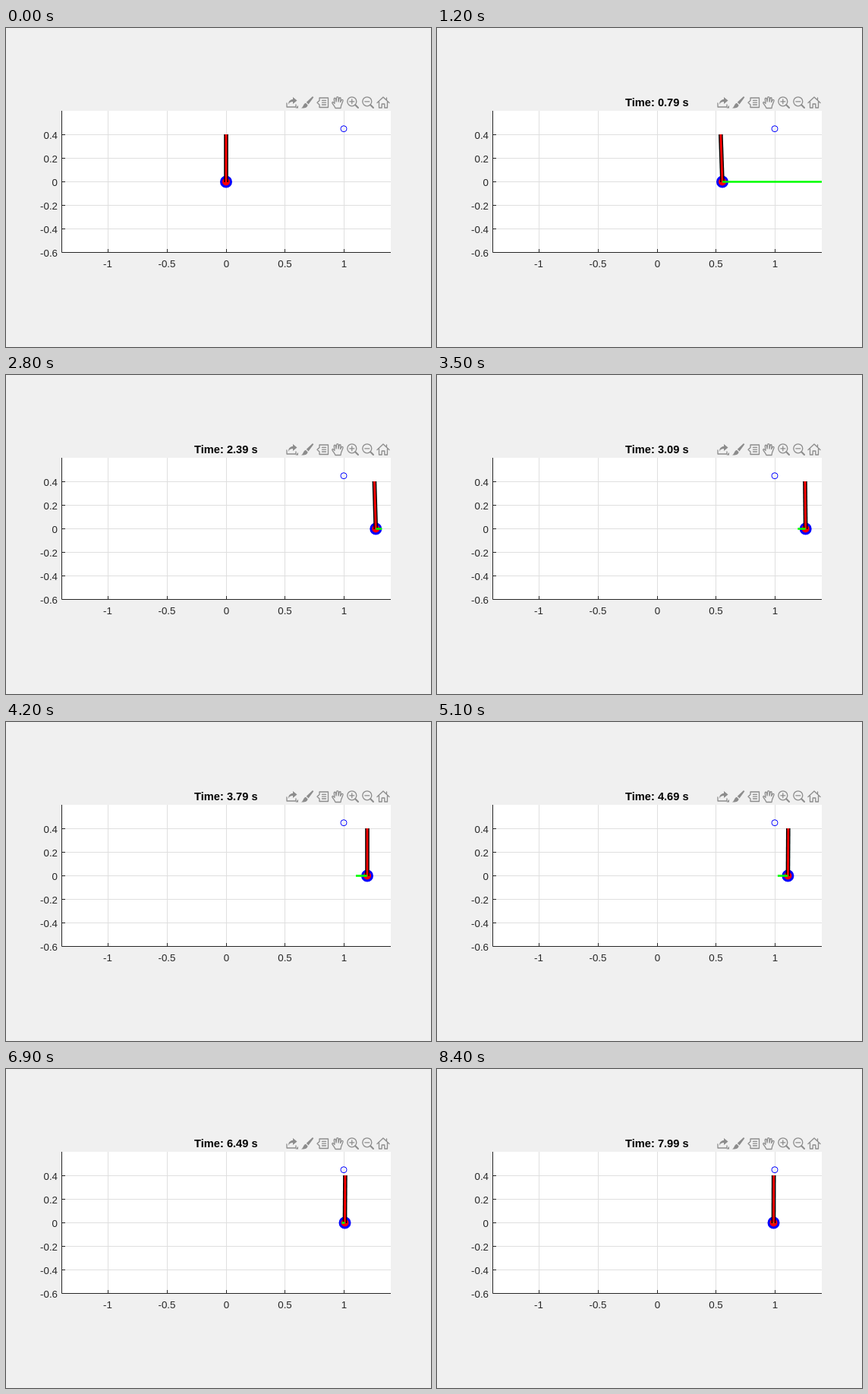
An HTML page for the animation above (8.5 s loop, 560x420 px).

```html
<!DOCTYPE html>
<html lang="en">
<head>
<meta charset="utf-8">
<title>Cart and pole</title>
<style>
  html, body { margin: 0; width: 100%; height: 100%; overflow: hidden; background: #f0f0f0; }
  svg { display: block; width: 560px; height: 420px; }
  text { font: 13.33px "Liberation Sans", Arial, sans-serif; fill: #262626; }
  #title { font-size: 14.67px; font-weight: bold; fill: #000; }
  #grid { stroke: #dfdfdf; }
  #axes { stroke: #262626; fill: none; }
  #tools { stroke: #8c8c8c; stroke-width: 1.3; fill: none; stroke-linecap: round; stroke-linejoin: round; }
  #tools .solid { fill: #8c8c8c; stroke: none; }
</style>
</head>
<body>
<svg viewBox="0 0 560 420">
  <defs>
    <clipPath id="plot"><rect x="73" y="109" width="434" height="187"/></clipPath>
    <g id="lens">
      <circle cx="-1.2" cy="-1.2" r="6"/>
      <path d="M3.2 3.2L7 7" stroke-width="2"/>
    </g>
  </defs>
  <rect width="560" height="420" fill="#f0f0f0"/>
  <rect x="73" y="109" width="434" height="187" fill="#fff"/>
  <path id="grid"/>
  <path id="axes"/>
  <g id="labels"></g>
  <text id="title" x="248" y="103"></text>

  <g id="tools">
    <g transform="translate(377 98)">
      <path d="M-7 1V6H5V3"/>
      <path class="solid" d="M-5 3C-5 -2 -2 -4 1 -4V-7L6.5 -2.5L1 2V-1C-2 -1 -4 0 -5 3ZM4.5 7.5H8V4Z"/>
    </g>
    <g transform="translate(397 98)">
      <path class="solid" d="M7 -8L8.3 -6.7L1.5 2.5L-1.2 -.2ZM-2 .8L.6 3.4C0 7 -4 7.5 -8 7.5C-5 6 -5.5 2 -2 .8Z"/>
    </g>
    <g transform="translate(417 98)">
      <path d="M-4 -6H7.5V6.5H-4V3L-7 .2L-4 -2.6ZM-.5 -2.6H4.5M-.5 .2H4.5M-.5 3H4.5"/>
    </g>
    <g transform="translate(437 98)">
      <path d="M-3 7.5C-4 5 -6 3 -7.2 .8C-7.5 -1 -5.5 -1 -4 1.5L-4.8 -4.5C-4.8 -6.2 -2.8 -6.2 -2.6 -4.5L-2 -1L-1.5 -6C-1.2 -7.8 .8 -7.8 1 -6V-1L2 -5.3C2.5 -6.8 4.3 -6.5 4.1 -4.8L3.6 -.5L5 -3C6 -4.2 7.5 -3.4 7 -2L4.5 4.5L4 7.5Z"/>
    </g>
    <g transform="translate(457 98)"><use href="#lens"/><path d="M-4.2 -1.2H1.8M-1.2 -4.2V1.8"/></g>
    <g transform="translate(477 98)"><use href="#lens"/><path d="M-4.2 -1.2H1.8"/></g>
    <g transform="translate(497 98)"><path d="M-8 .5L0 -7L8 .5M-5.5 -1V7H-1.8V2H1.8V7H5.5V-1M4.5 -6V-3.5"/></g>
  </g>

  <g clip-path="url(#plot)">
    <circle id="wheel" cy="202.5" r="6.5" fill="#f00" stroke="#00f" stroke-width="3"/>
    <path id="poleEdge" stroke="#000" stroke-width="5.6"/>
    <path id="pole" stroke="#f00" stroke-width="2.8"/>
    <path id="speed" stroke="#0f0" stroke-width="2.7"/>
    <circle cx="445" cy="132.7" r="4" fill="none" stroke="#00f"/>
  </g>
</svg>
<script>
const $ = id => document.getElementById(id);
const LOOP = 8500, HOLD = 500, STEP = 100;
const AXIS_Y = 202.5, POLE = 62.5;

// Knots: [time s, cart x px, speed px/s]
const track = [
  [0, 290, 0], [0.79, 376, 147], [2.39, 487.3, 8], [3.79, 476, -15],
  [4.69, 462.4, -13.5], [6.49, 446.5, -4], [7.99, 443.5, -0.6]
];
// Knots: [time s, pole lean px, lean rate px/s]
const lean = [
  [0, 0, 0], [0.27, 7, 0], [0.79, -2.2, -9], [1.4, -4, 0], [2.39, -1.9, 1.6],
  [3.79, 0, 0.3], [4.69, 0.4, 0.1], [6.49, 0.4, 0], [7.99, 0.2, 0]
];

// Cubic Hermite value and slope at time t
function sample(knots, t) {
  let i = 0;
  while (i < knots.length - 2 && t > knots[i + 1][0]) i++;
  const [t0, p0, v0] = knots[i], [t1, p1, v1] = knots[i + 1];
  const h = t1 - t0, s = (t - t0) / h, d = p1 - p0;
  const a = h * (v0 + v1) - 2 * d, b = 3 * d - h * (2 * v0 + v1);
  return {
    value: p0 + s * (h * v0 + s * (b + s * a)),
    slope: v0 + s * (2 * b + 3 * s * a) / h
  };
}

function buildAxes() {
  const xs = [-1, -0.5, 0, 0.5, 1], ys = [0.4, 0.2, 0, -0.2, -0.4, -0.6];
  let grid = "", ticks = "M73.5 109V295.5H507", labels = "";
  xs.forEach((v, i) => {
    const x = Math.floor(134.8 + i * 77.6) + 0.5;
    grid += `M${x} 109V295`;
    ticks += `M${x} 295.5V291`;
    const shift = v < 0 ? -0.5 : 0;
    labels += `<text x="${x + shift}" y="315" text-anchor="middle">${v}</text>`;
  });
  ys.forEach((v, i) => {
    const y = Math.floor(140.2 + i * 31.1) + 0.5;
    if (i < 5) {
      grid += `M74 ${y}H507`;
      ticks += `M73.5 ${y}H78`;
    }
    labels += `<text x="68" y="${y + 5.5}" text-anchor="end">${v}</text>`;
  });
  $("grid").setAttribute("d", grid);
  $("axes").setAttribute("d", ticks);
  $("labels").innerHTML = labels;
}

function draw(ms) {
  const running = ms >= HOLD;
  const t = running ? 0.09 + Math.floor((ms - HOLD) / STEP) * 0.1 : 0;
  const { value: x, slope: v } = sample(track, t);
  const dx = sample(lean, t).value;
  const top = AXIS_Y - Math.sqrt(POLE * POLE - dx * dx);
  const rod = `M${x} ${AXIS_Y + 0.5}L${x + dx} ${top}`;
  $("wheel").setAttribute("cx", x);
  $("poleEdge").setAttribute("d", rod);
  $("pole").setAttribute("d", rod);
  $("speed").setAttribute("d", running ? `M${x} ${AXIS_Y}H${x + v}` : "");
  $("title").textContent = running ? `Time: ${t.toFixed(2)} s` : "";
}

buildAxes();
const start = performance.now();
function tick() {
  draw((performance.now() - start) % LOOP);
  requestAnimationFrame(tick);
}
draw(0);
requestAnimationFrame(tick);
</script>
</body>
</html>
```
